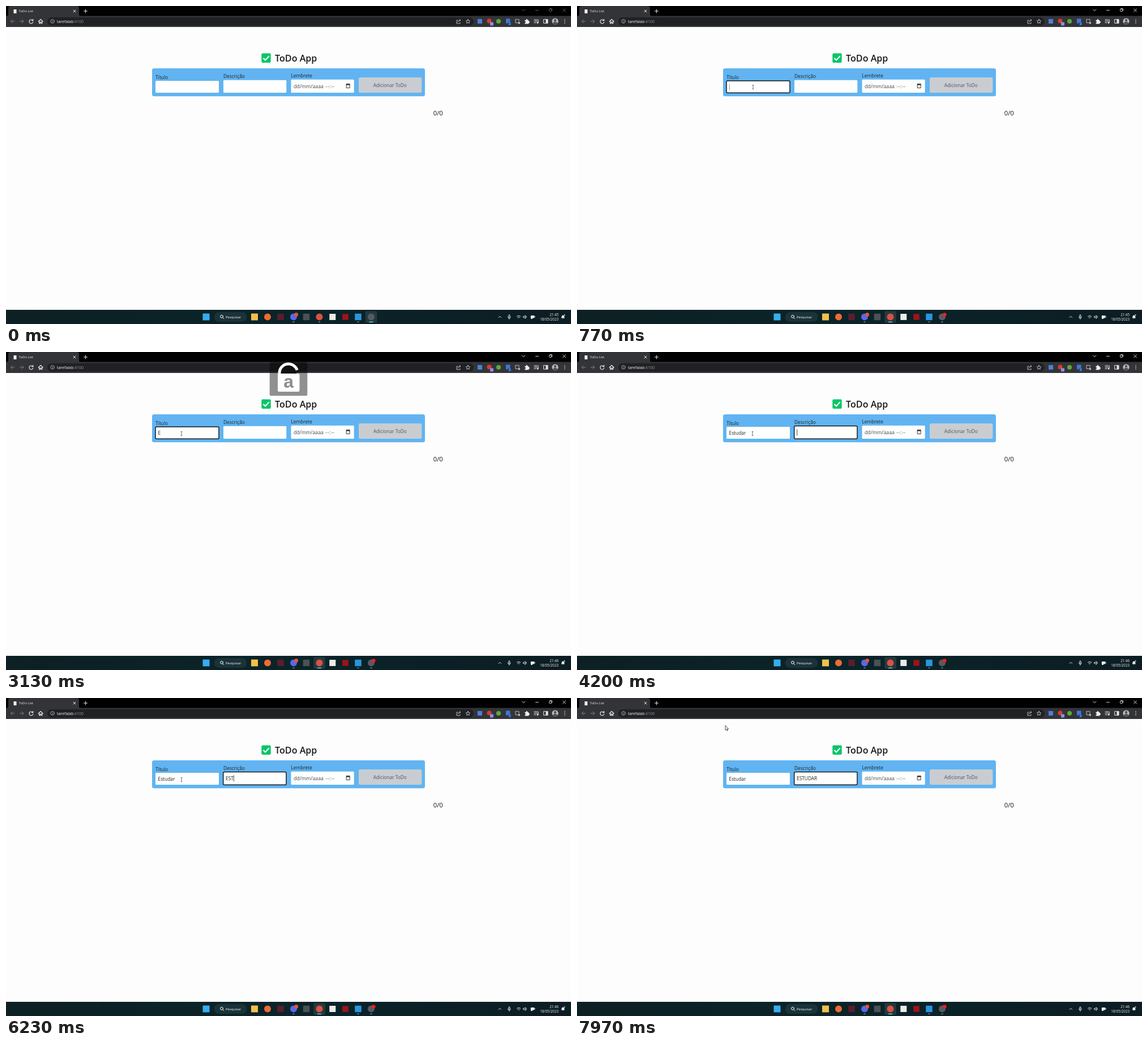
These frames come from a looping animation (998x561 px, 8 s). An HTML page:

```html
<!DOCTYPE html>
<html lang="pt-BR">
<head>
<meta charset="utf-8">
<title>ToDo List</title>
<style>
html, body { margin: 0; width: 100%; height: 100%; overflow: hidden; background: #fdfdfd; }
svg { display: block; width: 100%; height: 100%; }
text { font-family: "Open Sans", "Noto Sans", sans-serif; font-size: 8.35px; fill: #202326; white-space: pre; }
.tiny { font-size: 6px; fill: #f2f2f2; }
.line { fill: none; stroke: #e4e6e8; stroke-width: 1; stroke-linecap: round; stroke-linejoin: round; }
.big { font: bold 32px "Liberation Sans", Arial, sans-serif; fill: #8d8d8d; text-anchor: middle; }
</style>
</head>
<body>
<svg viewBox="0 0 998 561">
  <defs>
    <linearGradient id="bar">
      <stop offset="0" stop-color="#0d2023"/>
      <stop offset=".5" stop-color="#0a2429"/>
      <stop offset="1" stop-color="#0c1d23"/>
    </linearGradient>
  </defs>
  <rect width="998" height="561" fill="#fdfdfd"/>

  <!-- browser -->
  <rect width="998" height="18" fill="#010101"/>
  <path d="M1 18Q4 18 4 14V4Q4 0 8 0H125Q129 0 129 4V14Q129 18 132 18Z" fill="#333437"/>
  <rect y="17.5" width="998" height="19.5" fill="#333437"/>
  <rect x="73" y="20" width="753" height="14.5" rx="7.2" fill="#202124"/>
  <rect x="13.5" y="6" width="5" height="7" rx=".6" fill="#f4f4f4"/>
  <text class="tiny" x="22.5" y="11.2">ToDo List</text>
  <path class="line" d="M119 7l4 4m0-4l-4 4M137.5 9h6m-3-3v6"/>
  <path class="line" style="stroke:#7d8084" d="M15 27H8.5m3-3l-3 3 3 3M24.5 27H31m-3-3l3 3-3 3"/>
  <path class="line" style="stroke-width:1.2" d="M47.2 25.4A3.4 3.4 0 1 0 47.8 28M47.8 23.4v2.3h-2.3M57.3 27.3l3.9-3.8 3.9 3.8M58.7 26.5v4.2h1.6v-2.4h1.8v2.4h1.6v-4.2"/>
  <g class="line" style="stroke:#bfc2c5;stroke-width:.8"><circle cx="82" cy="27" r="3.3"/><path d="M82 26.8v1.8M82 25.2v.1"/></g>
  <text x="90" y="29.6" style="font-size:7px;fill:#f2f2f2">tarefalab<tspan fill="#96999d">:4100</tspan></text>
  <path class="line" style="stroke:#c7c9cb;stroke-width:.9" d="M798 25h-2v6h6v-2M798 28.5q.5-3.5 4.5-3.5m-1.5-1.8l2 1.8-2 1.8M816 23.4l1.1 2.4 2.6.3-1.9 1.8.5 2.6-2.3-1.3-2.3 1.3.5-2.6-1.9-1.8 2.6-.3z"/>
  <rect x="833" y="23" width="8" height="8" fill="#4b80dc"/>
  <circle cx="853.5" cy="26.5" r="4" fill="#d83b32"/>
  <rect x="855" y="28.5" width="6" height="6" rx="1" fill="#8a8ff0"/>
  <circle cx="870" cy="27" r="4" fill="#5fa83c"/>
  <rect x="883" y="22.5" width="7.5" height="8" fill="#3d78d8"/>
  <rect x="887" y="28.5" width="5.5" height="6" rx="1" fill="#1d4e96"/>
  <text x="888.3" y="33.3" style="font-size:4.8px;fill:#fff">2</text>
  <rect class="line" x="900" y="23.7" width="6" height="6" stroke-dasharray="1.2 1.5"/>
  <path class="line" d="M905 30h3m-1.5-1.5v3"/>
  <path fill="#eee" d="M916.5 25h2q-.3-2 1.4-2t1.4 2h2v2q1.8-.2 1.8 1.4t-1.8 1.4v1.7h-6.8v-2q1.6 0 1.6-1.2t-1.6-1.2z"/>
  <path class="line" d="M933 24.2h5.5M933 26.8h5.5M933 29.4h3M940.2 24v5.2"/>
  <circle cx="939" cy="29.5" r="1.4" fill="#e4e6e8"/>
  <rect class="line" x="950" y="23.7" width="7" height="6.6"/>
  <rect x="953.5" y="23.7" width="3.5" height="6.6" fill="#e4e6e8"/>
  <circle cx="970" cy="27" r="5.6" fill="#b9bbb9"/>
  <path d="M966 31q.2-3 4-3t4 3q-4 3-8 0zM967.8 25.3a2.2 2.4 0 1 1 4.4 0a2.2 2.4 0 1 1-4.4 0" fill="#4d5153"/>
  <path class="line" style="stroke-width:1.6" d="M987 24v.1M987 27v.1M987 30v.1"/>
  <g id="controls" class="line" style="stroke-width:.9">
    <path d="M911.5 6l2.7 2.6L917 6M935.5 7.5h5M983.6 5l5 5m0-5l-5 5"/>
    <rect x="959.5" y="5.5" width="4" height="4" rx=".8"/><path d="M961 4.4h2.6q1 0 1 1V8"/>
  </g>

  <!-- page -->
  <rect x="451.3" y="83.5" width="16.4" height="16.4" rx="2" fill="#06c667"/>
  <path d="M454.5 92l3.5 3.5 6.7-7.3" fill="none" stroke="#fff" stroke-width="2.1"/>
  <text x="475" y="97.6" style="font-size:16.1px;font-weight:600;fill:#17191b">ToDo App</text>
  <rect x="258" y="110" width="482" height="49.3" rx="3.5" fill="#61b4f1"/>
  <text x="264.2" y="129.2">Título</text>
  <text x="384" y="127.4">Descrição</text>
  <text x="503.5" y="126.3">Lembrete</text>
  <rect x="264" y="132" width="112" height="21" rx="1.5" fill="#fefefe"/>
  <rect x="384" y="130.8" width="111.3" height="22.2" rx="1.5" fill="#fefefe"/>
  <rect x="503.5" y="129.7" width="111.2" height="23.3" rx="1.5" fill="#fefefe"/>
  <rect x="623" y="126" width="111.3" height="27" rx="2.5" fill="#c9cdd1"/>
  <text x="678.3" y="142.8" text-anchor="middle" style="fill:#50555a">Adicionar ToDo</text>
  <text x="508" y="144.6" style="font-size:8.75px;fill:#44484b">dd/mm/aaaa</text>
  <text x="564.3" y="144.6" style="font-size:8.75px;letter-spacing:.55px;fill:#44484b">--:--</text>
  <path d="M601.2 138.2h6v6.3h-6z" fill="none" stroke="#222" stroke-width=".9"/>
  <path d="M601 137.6h6.4v2H601zM602 136.5h1v1.5h-1zM605.4 136.5h1v1.5h-1z" fill="#222"/>
  <text x="754.8" y="193.2" style="font-size:11.2px;font-weight:500;fill:#111">0/0</text>
  <rect id="ring" fill="none" stroke="#15191d" stroke-width="1.5" rx="2"/>
  <text id="title" x="268.5" y="146.4"></text>
  <text id="desc" x="388" y="145"></text>
  <rect id="caret" width=".9" height="11"/>

  <!-- taskbar -->
  <rect y="536" width="998" height="25" fill="url(#bar)"/>
  <rect id="active" y="538.3" width="20.5" height="20.5" rx="2" fill="#24393e"/>
  <rect x="367.5" y="540" width="58" height="17" rx="8.5" fill="#1b3338"/>
  <g class="line" style="stroke:#fff"><circle cx="381" cy="547.8" r="2.4"/><path d="M382.8 549.7l2 2"/></g>
  <text class="tiny" x="388" y="551" style="fill:#fff">Pesquisar</text>
  <g id="apps"></g>
  <circle cx="512.7" cy="544.5" r="3.4" fill="#e2533f"/>
  <circle id="rec" cx="649.2" cy="544.6" r="3.4" fill="#ee1f22"/>
  <g id="marks" fill="#8b9698"></g>
  <rect id="accent" y="556.7" width="8" height="1.6" rx=".8" fill="#5cc3ee"/>
  <g class="line" style="stroke:#f0f2f2;stroke-width:.9">
    <path d="M870 549.6l2.3-2.3 2.3 2.3M886.6 548.3q0 2.6 2.3 2.6t2.3-2.6M888.9 551v1.6"/>
    <rect x="887.8" y="545" width="2.2" height="4.3" rx="1.1"/>
    <path d="M902.4 547.6q3.2-2.8 6.4 0M903.8 549.2q1.8-1.5 3.6 0M905.6 551v.1M914 547.6h1.3l2-1.7v5.4l-2-1.7H914zM919 547q1 1.5 0 3"/>
  </g>
  <rect x="926.8" y="546" width="6.6" height="4.6" rx="1" fill="#f0f2f2"/>
  <path d="M933.7 547.3h1v2h-1zM927 549h3v3h-3z" fill="#f0f2f2"/>
  <text id="clock" class="tiny" x="976" y="547.2" text-anchor="end" style="font-size:6.2px"></text>
  <text class="tiny" x="976" y="555.2" text-anchor="end" style="font-size:6.2px">18/05/2023</text>
  <path d="M980.5 550.5q1-.8 1-2.5 0-2.5 2.3-2.5t2.3 2.5q0 1.700 1 2.500zM982.800 551.200h2q-1 1.200-2 0z" fill="#f0f2f2"/>
  <path class="line" style="stroke-width:.7" d="M985.5 544.500h1.800l-1.800 2h1.800"/>

  <!-- caps lock panel -->
  <g id="lock">
    <rect x="465.700" y="18" width="66.600" height="59.300" rx="2.500" fill="#000" opacity=".43"/>
    <path id="hole" d="M485 39V37a14 14 0 0 1 28 0v2z" fill="#101112"/>
    <path id="shackle" fill="none" stroke="#fff" stroke-width="5"/>
    <rect x="480" y="38" width="38.500" height="32" rx="2.500" fill="#fff"/>
    <text id="letter" class="big" x="499.200"></text>
  </g>

  <path id="beam" d="M-1.300-3.500H1.300M0-3.500V3.500M-1.300 3.500H1.300" fill="none" stroke="#45484a" stroke-width=".8"/>
  <path id="arrow" d="M0 0V8.200L1.900 6.600 3.100 9.300 4.400 8.700 3.200 6.100H5.700Z" fill="#fff" stroke="#222" stroke-width=".8"/>
</svg>
<script>
const LOOP = 8000, BLINK = 530, FOCUS = 620, TAB = 4130;
const $ = id => document.getElementById(id);
const set = (id, attrs) => { for (const k in attrs) $(id).setAttribute(k, attrs[k]); };
const show = (id, on) => { $(id).style.display = on ? '' : 'none'; };

// centre, colour, size, round
const apps = [
  [353.5, '#35aef0', 12], [439, '#f2c04b', 12], [462, '#ef6b35', 12, 1],
  [485, '#5b1d2b', 11.5], [508, '#5967ea', 12, 1], [530.5, '#4b5155', 11.500],
  [553.5, '#dc5142', 12, 1], [576.800, '#ecebe8', 11], [599.5, '#a0121b', 10.5],
  [622, '#2995df', 11.500], [645, '#555b61', 12, 1]
];
$('apps').innerHTML = apps.map(([x, fill, s, round]) =>
  `<rect x="${x - s / 2}" y="${548.5 - s / 2}" width="${s}" height="${s}" rx="${round ? s / 2 : 0}" fill="${fill}"/>`).join('');
$('marks').innerHTML = [508, 553.5, 622, 645].map(x =>
  `<rect x="${x - 1.8}" y="556.8" width="3.6" height="1.3" rx=".6"/>`).join('');

const titleKeys = [2550, 3400, 3510, 3620, 3730, 3830, 3940];
const descKeys = [5830, 6010, 6150, 6400, 6560, 6900, 7080];
const typed = (word, keys, t) => word.slice(0, keys.filter(k => k <= t).length);

// start, end, caps on
const panels = [[1880, 2820, true], [2820, 3850, false], [4520, 5560, true]];

// time, x, y
const route = [[60, -8, 95], [520, 311, 143], [1000, 311, 143], [1100, 310, 144], [7700, 310, 144], [7930, 262, 48.5], [8000, 262, 48.5]];
function pointer(t) {
  if (t < route[0][0]) return [-20, 95];
  const i = route.findIndex(p => p[0] > t);
  const [a, x, y] = route[i - 1], [b, u, v] = route[i];
  const p = (t - a) / (b - a), e = p * p * (3 - 2 * p);
  return [x + (u - x) * e, y + (v - y) * e];
}

function drawField(t) {
  const title = typed('Estudar', titleKeys, t), desc = typed('ESTUDAR', descKeys, t);
  $('title').textContent = title;
  $('desc').textContent = desc;
  const focused = t >= FOCUS, second = t >= TAB;
  show('ring', focused);
  set('ring', second
    ? { x: 383.7, y: 130.5, width: 111.3, height: 22.7 }
    : { x: 264, y: 132, width: 112, height: 21.3 });
  const last = Math.max(...[FOCUS, TAB, ...titleKeys, ...descKeys].filter(k => k <= t));
  show('caret', focused && (t - last) % (2 * BLINK) < BLINK);
  const id = second ? 'desc' : 'title', text = second ? desc : title;
  const start = second ? 388 : 268.5;
  set('caret', {
    x: start + (text ? $(id).getComputedTextLength() : .3),
    y: second ? 136.3 : 137.5,
    fill: second ? '#303336' : '#85898c'
  });
}

function drawLock(t) {
  const panel = panels.find(([a, b]) => t >= a && t < b);
  show('lock', panel);
  if (!panel) return;
  const caps = panel[2];
  $('letter').textContent = caps ? 'A' : 'a';
  set('letter', { y: caps ? 65 : 62.5 });
  set('shackle', { d: 'M483 40V37a16 16 0 0 1 ' + (caps ? '32 0V40' : '31.200-5') });
}

function draw(t) {
  const focused = t >= FOCUS;
  $('controls').style.opacity = focused ? 1 : .45;
  show('rec', focused);
  set('active', { x: focused ? 543.300 : 634.800 });
  set('accent', { x: focused ? 549.500 : 641 });
  $('clock').textContent = t < 2900 ? '21:45' : '21:46';
  drawField(t);
  drawLock(t);
  const [x, y] = pointer(t);
  const inField = x > 264 && x < 376 && y > 132 && y < 153;
  const place = { transform: `translate(${x} ${y})` };
  show('beam', inField);
  show('arrow', !inField);
  set('beam', place);
  set('arrow', place);
}

const begin = performance.now();
function tick() {
  draw((performance.now() - begin) % LOOP);
  requestAnimationFrame(tick);
}
tick();
</script>
</body>
</html>
```
